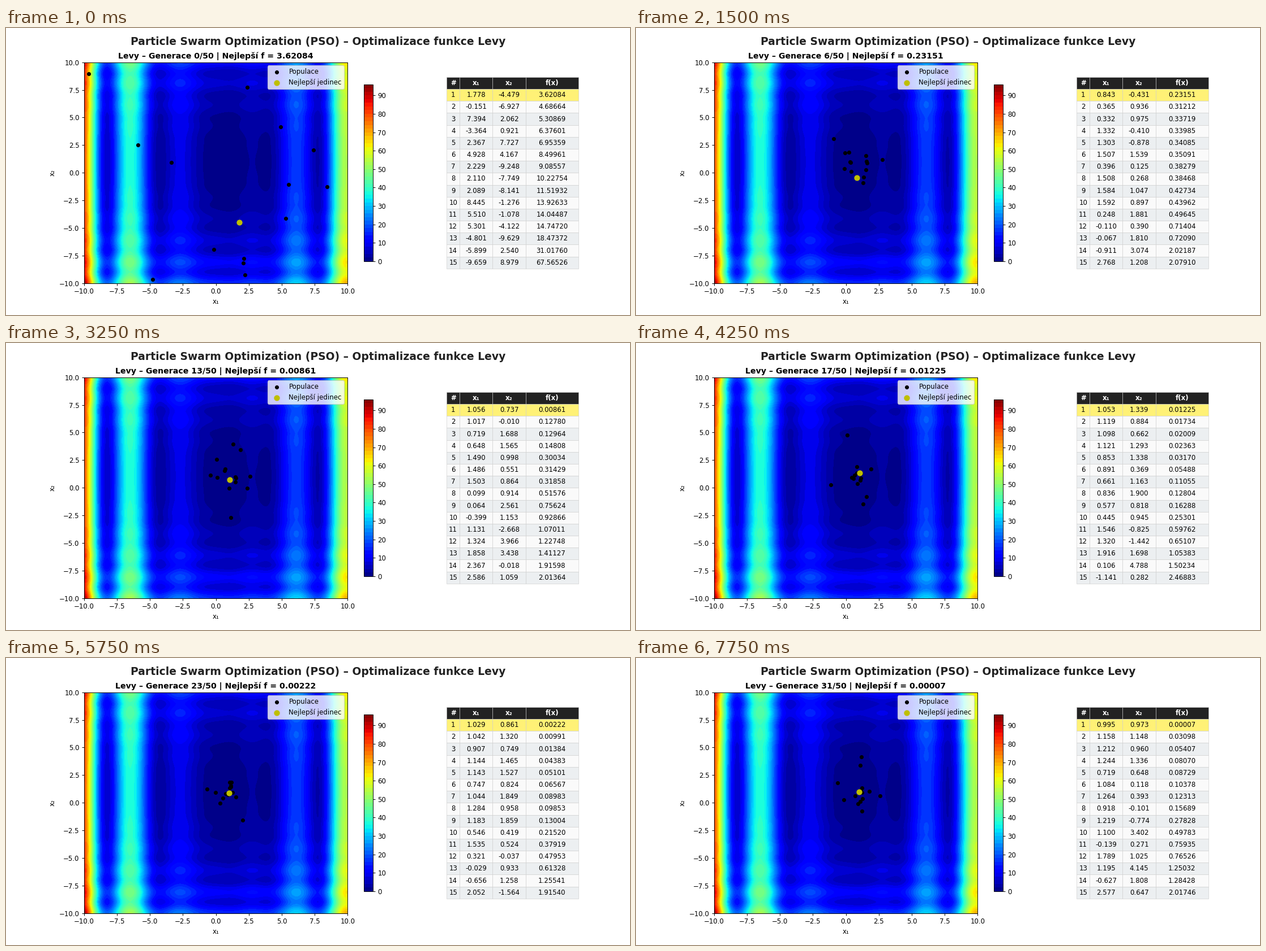
A matplotlib script for the animation above (8 s loop, 1102 by 508 pixels).

```python
import numpy as np
import matplotlib.pyplot as plt
from matplotlib.animation import FuncAnimation

WIDTH, HEIGHT = 1102, 508
LAYOUT_W, LAYOUT_H = 1101.56, 508.42  # 13 x 6 inch layout, just off the pixel grid
DPI = LAYOUT_W / 13
SX, SY = LAYOUT_W / WIDTH, LAYOUT_H / HEIGHT
FRAMES, STEP_MS, TOTAL_GEN = 32, 250, 50
SIZE = 15
plt.rcParams["font.family"] = "DejaVu Sans"

# Starting swarm, best particle first
START = np.array([
    (1.778, -4.479), (-0.151, -6.927), (7.394, 2.062), (-3.364, 0.921),
    (2.367, 7.727), (4.928, 4.167), (2.229, -9.248), (2.110, -7.749),
    (2.089, -8.141), (8.445, -1.276), (5.510, -1.078), (5.301, -4.122),
    (-4.801, -9.629), (-5.899, 2.540), (-9.659, 8.979)])

# Path of the leading particle
LEAD_GEN = [0, 6, 13, 17, 23, 27, 31]
LEAD_X = [1.778, 0.843, 1.056, 1.053, 1.029, 1.010, 0.995]
LEAD_Y = [-4.479, -0.431, 0.737, 1.339, 0.861, 1.020, 0.973]


def levy(x, y):
    a, b = 1 + (x - 1) / 4, 1 + (y - 1) / 4
    return (np.sin(np.pi * a) ** 2
            + (a - 1) ** 2 * (1 + 10 * np.sin(np.pi * a + 1) ** 2)
            + (b - 1) ** 2 * (1 + np.sin(2 * np.pi * b) ** 2))


def swarm(gen):
    """Positions and values, best first: damped swings around the optimum (1, 1)."""
    rng = np.random.default_rng(gen)
    decay = np.exp(-gen / 2)
    jitter = rng.laplace(0, (0.5, 0.7), START.shape)
    offset = (START - 1) * decay * np.cos(1.3 * gen) + jitter * (1 - decay)
    lead = np.array([np.interp(gen, LEAD_GEN, LEAD_X), np.interp(gen, LEAD_GEN, LEAD_Y)])
    offset[0] = lead - 1

    # Push out any follower that would overtake the leader
    val = levy(*(1 + offset).T)
    ahead = val < val[0]
    push = np.sqrt(val[0] / val[ahead]) * rng.uniform(1.05, 1.6, ahead.sum())
    offset[ahead] *= push[:, None]

    pos = np.clip(1 + offset, -10, 10)
    val = levy(*pos.T)
    order = np.argsort(val)
    return pos[order], val[order]


fig, (ax, side) = plt.subplots(
    1, 2, figsize=((WIDTH + 0.01) / DPI, (HEIGHT + 0.01) / DPI), dpi=DPI,
    gridspec_kw=dict(width_ratios=[3, 1], left=0.125 * SX, right=0.9 * SX,
                     bottom=0.11 * SY, top=0.88 * SY))
fig.suptitle("Particle Swarm Optimization (PSO) – Optimalizace funkce Levy",
             fontsize=16, fontweight="bold", color="#222222",
             x=0.5 * SX, y=0.97 * SY)

# Landscape
axis = np.linspace(-10, 10, 200)
gx, gy = np.meshgrid(axis, axis)
surface = ax.contourf(gx, gy, levy(gx, gy), levels=np.arange(0, 97, 2), cmap="jet")
fig.colorbar(surface, ax=ax, shrink=0.8)
ax.set(xlim=(-10, 10), ylim=(-10, 10), xlabel="x₁", ylabel="x₂")
dots = ax.scatter([], [], c="black", s=25, label="Populace", zorder=3)
best = ax.scatter([], [], c="y", s=60, label="Nejlepší jedinec", zorder=4)
ax.legend(loc="upper right")
title = ax.set_title("", fontsize=12, fontweight="bold")

# Ranking
side.axis("off")
table = side.table(cellText=[[""] * 4 for _ in range(SIZE)],
                   colLabels=["#", "x₁", "x₂", "f(x)"],
                   colWidths=[0.1, 0.25, 0.25, 0.4],
                   cellLoc="center", loc="center")
table.auto_set_font_size(False)
table.set_fontsize(10)
table.scale(1.2, 1.5)
for (row, col), cell in table.get_celld().items():
    cell.set_edgecolor("#cccccc")
    cell.set_linewidth(0.5)
    if row == 0:
        cell.set_facecolor("#222222")
        cell.set_text_props(color="white", fontweight="bold")
    elif row == 1:
        cell.set_facecolor("#fff176")
    else:
        cell.set_facecolor("#eceff1" if row % 2 else "#fafafa")


def update(gen):
    pos, val = swarm(gen)
    dots.set_offsets(pos)
    best.set_offsets(pos[:1])
    title.set_text(f"Levy – Generace {gen}/{TOTAL_GEN} | Nejlepší f = {val[0]:.5f}")
    for i, ((x, y), f) in enumerate(zip(pos, val), 1):
        for col, text in enumerate([str(i), f"{x:.3f}", f"{y:.3f}", f"{f:.5f}"]):
            table[i, col].get_text().set_text(text)
    return dots, best, title, table


anim = FuncAnimation(fig, update, frames=FRAMES, interval=STEP_MS,
                     repeat=True, repeat_delay=0, blit=False)
plt.show()
```
